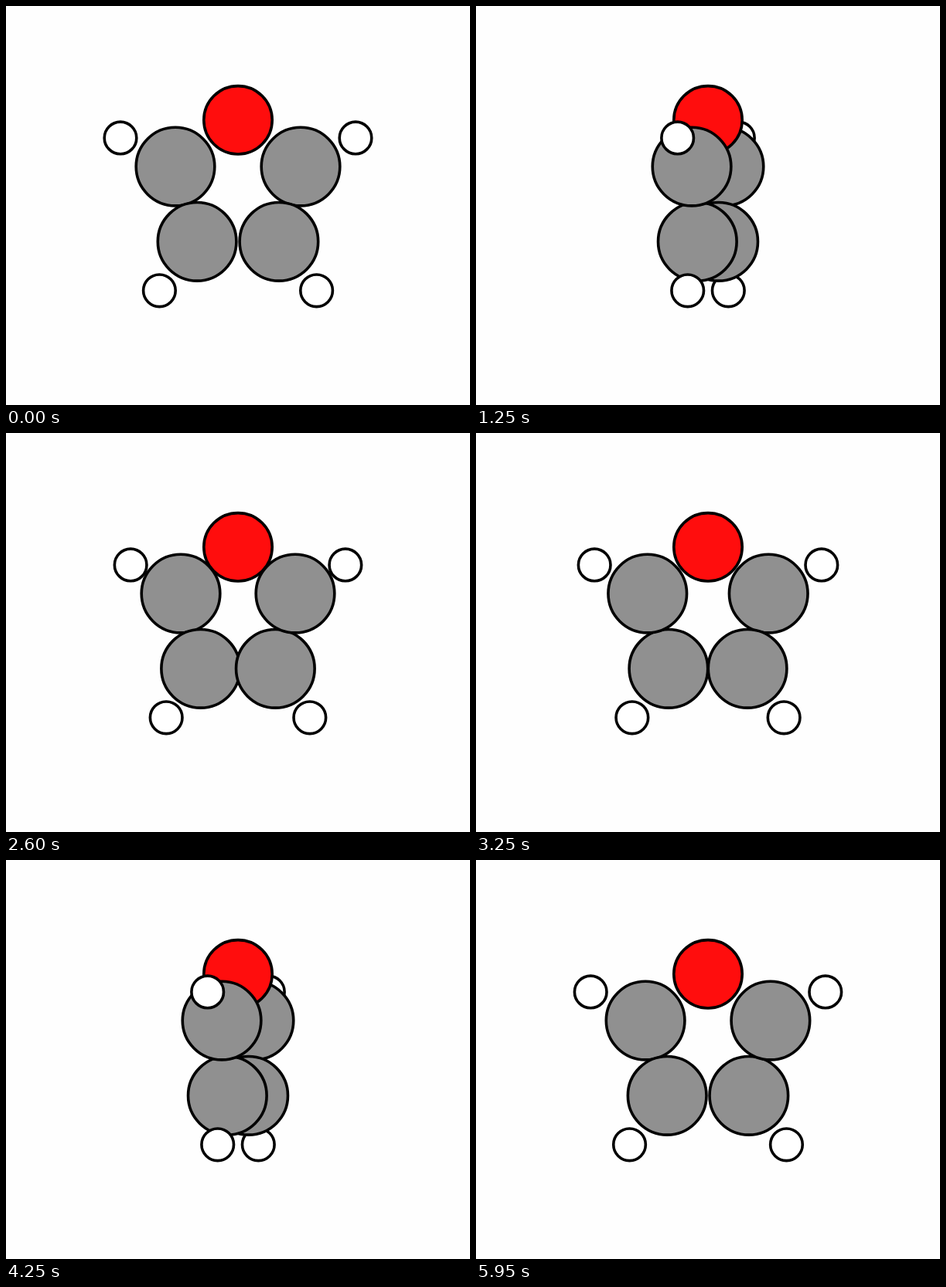
Recreate the animation shown at these times as an HTML page with a canvas. Size 600 px wide and 517 px high, loop 6 s.

```html
<!DOCTYPE html>
<html lang="en">
<head>
<meta charset="utf-8">
<title>Rotating ring molecule</title>
<style>
  html, body { margin: 0; width: 100%; height: 100%; overflow: hidden; background: #fefefe; }
  canvas { display: block; }
</style>
</head>
<body>
<canvas id="stage" width="600" height="517"></canvas>
<script>
const ctx = document.getElementById('stage').getContext('2d');
const LOOP = 6000, STEP = 50, AXIS = 300;

const oxygen = { r: 44.2, fill: '#ff0d0d' };
const carbon = { r: 50.8, fill: '#909090' };
const hydrogen = { r: 20.8, fill: '#ffffff' };

// Mirrored atoms sit at equal distances on both sides of the vertical axis.
const pair = (kind, d, y) => [-d, d].map(x => ({ ...kind, x, y }));
const atoms = [
  { ...oxygen, x: 0, y: 147.8 },
  ...pair(carbon, 81, 208.1),
  ...pair(carbon, 52.9, 305.3),
  ...pair(hydrogen, 152, 170.9),
  ...pair(hydrogen, 101.6, 368.8)
];

function drawAtom({ x, y, r, fill }, cos) {
  ctx.beginPath();
  ctx.arc(AXIS + x * cos, y, r, 0, 2 * Math.PI);
  ctx.fillStyle = fill;
  ctx.fill();
  ctx.stroke();
}

function draw(now) {
  const time = Math.floor((now % LOOP) / STEP) * STEP;
  const angle = 2 * Math.PI * time / LOOP;
  const cos = Math.cos(angle), sin = Math.sin(angle);
  ctx.fillStyle = '#fefefe';
  ctx.fillRect(0, 0, 600, 517);
  ctx.lineWidth = 3.6;
  ctx.strokeStyle = '#000';
  // Depth is -x * sin; paint the farthest atoms first.
  [...atoms].sort((a, b) => (b.x - a.x) * sin).forEach(atom => drawAtom(atom, cos));
  requestAnimationFrame(draw);
}
draw(0);
</script>
</body>
</html>
```
